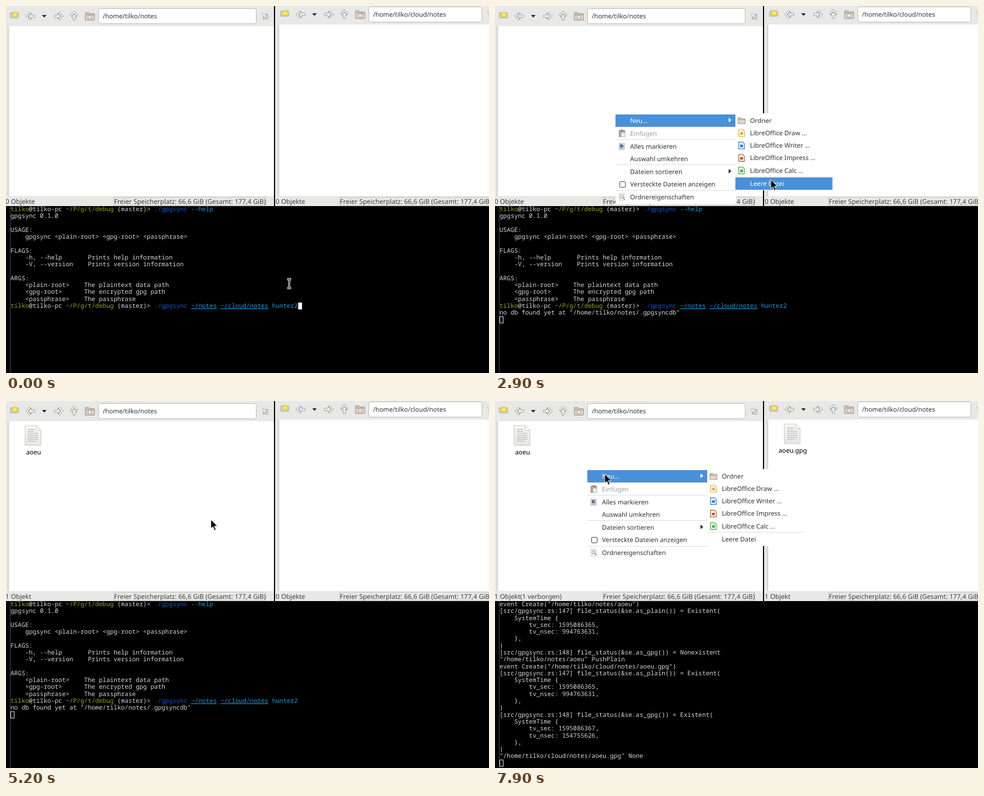
These frames come from a looping animation (858x653 px, 8000 ms). An HTML page:

```html
<!DOCTYPE html>
<html lang="de">
<head>
<meta charset="utf-8">
<title>gpgsync demo</title>
<style>
  html, body { margin: 0; width: 100%; height: 100%; overflow: hidden; background: #000; }
  svg { display: block; width: 858px; height: 653px; }
  text { font-family: "Noto Sans", sans-serif; font-size: 11.35px; fill: #2e3436;
         white-space: pre; text-rendering: geometricPrecision; }
  .status { font-size: 11.64px; fill: #3a3f41; }
  .term text { font-family: "Noto Sans Mono", monospace; font-size: 10.917px; fill: #d8d8d8; }
</style>
</head>
<body>
<svg id="stage" viewBox="0 0 858 653">
  <defs>
    <linearGradient id="button" x2="0" y2="1">
      <stop stop-color="#e9e9e7"/><stop offset="1" stop-color="#d2d2d0"/>
    </linearGradient>
    <linearGradient id="paper" x2="0" y2="1">
      <stop stop-color="#fafaf9"/><stop offset="1" stop-color="#e6e6e3"/>
    </linearGradient>
    <g id="arrow" stroke="#979797" fill="#f4f4f2" stroke-width="1" stroke-linejoin="round">
      <path d="M-9 0L-2-7L0-5L-5 0L0 5L-2 7Z"/>
      <path d="M-4 0L1-5V-2H7V2H1V5Z"/>
    </g>
    <g id="sheet">
      <path d="M.5.5H20L28.5 9V35.5H.5Z" fill="url(#paper)" stroke="#c4c4c0"/>
      <path d="M20 .5V9H28.5Z" fill="#fff" stroke="#c4c4c0"/>
      <path d="M5 7H17M5 10.5H17M5 14H24M5 17.5H24M5 21H24M5 24.5H24M5 28H19" stroke="#c3c3c1" stroke-width="1.4"/>
    </g>
    <g id="folder" stroke="#a89a8c">
      <path d="M-8-6.5H-2L0-4.5H8V7H-8Z" fill="#cbbfb2"/>
      <path d="M-8-2H8V7H-8Z" fill="#ded5cb"/>
    </g>
  </defs>
</svg>
<script>
const LOOP = 8000, STEP = 100, ROW = 12.29, CHAR = 6.55;
const USER = 'tilko', HOME = `/home/${USER}`;
const BLUE = '#4a90d9', BAR = '#e8e8e6';
const stage = document.getElementById('stage');

const escape = s => s.replace(/&/g, '&amp;').replace(/</g, '&lt;').replace(/>/g, '&gt;');
const label = (x, y, s, attrs = '') => `<text x="${x}" y="${y + 4}" ${attrs}>${escape(s)}</text>`;
const rect = (x, y, w, h, fill, attrs = '') =>
  `<rect x="${x}" y="${y}" width="${w}" height="${h}" fill="${fill}" ${attrs}/>`;
const group = (id, body, attrs = '') => `<g id="${id}" ${attrs}>${body}</g>`;
const use = (id, x, y, extra = '') => `<use href="#${id}" transform="translate(${x} ${y}) ${extra}"/>`;

// Terminal
const span = (color, s, attrs = '') => `<tspan fill="${color}" ${attrs}>${escape(s)}</tspan>`;
const prompt = span('#96a81e', USER) + `@${USER}-pc ` + span('#96a81e', '~/P/g/t/debug') +
  escape(' (master)> ') + span('#0a5bd0', './gpgsync') + ' ';
const argument = (s, attrs) => span('#1a9be0', s, attrs);
const underline = 'text-decoration="underline"';

const stamp = (sec, nsec) => ['    SystemTime {', `        tv_sec: ${sec},`, `        tv_nsec: ${nsec},`, '    },', ')'];
const plainCheck = ['[src/gpgsync.rs:147] file_status(&se.as_plain()) = Existent(', ...stamp(1595086365, 994763631)];
const gpgCheck = '[src/gpgsync.rs:148] file_status(&se.as_gpg()) = ';

const lines = [
  prompt + argument('--help'),
  ...[
    'gpgsync 0.1.0', '',
    'USAGE:', '    gpgsync <plain-root> <gpg-root> <passphrase>', '',
    'FLAGS:', '    -h, --help       Prints help information', '    -V, --version    Prints version information', '',
    'ARGS:', '    <plain-root>    The plaintext data path', '    <gpg-root>      The encrypted gpg path',
    '    <passphrase>    The passphrase'
  ].map(escape),
  prompt + argument('~/notes', underline) + ' ' + argument('~/cloud/notes', underline) + ' ' + argument('hunter2'),
  ...[
    `no db found yet at "${HOME}/notes/.gpgsyncdb"`,
    `event Create("${HOME}/notes/aoeu")`, ...plainCheck, gpgCheck + 'Nonexistent',
    `"${HOME}/notes/aoeu" PushPlain`,
    `event Create("${HOME}/cloud/notes/aoeu.gpg")`, ...plainCheck,
    gpgCheck + 'Existent(', ...stamp(1595086367, 154755626),
    `"${HOME}/cloud/notes/aoeu.gpg" None`
  ].map(escape)
];
const terminal = rect(0, 356, 858, 297, '#000') + rect(7, 356, 1, 297, '#4c4c4c') +
  group('scroll', lines.map((line, i) => `<text class="line" x="8" y="${365 + i * ROW}">${line}</text>`).join('') +
    rect(0, 0, 6, 11.4, '#fff', 'id="caret" stroke="#e6e6e6"'));

// File manager windows
const toolbar = (entryWidth, path) =>
  rect(8, 12, 14, 9, '#d9d0c4', 'rx="1" stroke="#a59b8f"') +
  '<path d="M16 9L17.7 13L22 13.4L18.8 16.2L19.8 20.4L16 18.2L12.2 20.4L13.2 16.2L10 13.4L14.3 13Z" fill="#fff04a" stroke="#e2c91c" stroke-width=".8"/>' +
  use('arrow', 44, 18) + '<path d="M64 16H72L68 20.5Z" fill="#222"/>' +
  use('arrow', 93, 18, 'scale(-1 1)') + use('arrow', 121, 18, 'rotate(90)') + use('folder', 149, 18) +
  '<path d="M145 20L149 16L153 20H152V23H146V20Z" fill="#efe9e2" stroke="#a08f80" stroke-width=".8"/>' +
  rect(164.5, 4.5, entryWidth, 27, '#fff', 'rx="3" stroke="#b9b9b6"') + label(172, 18, path) +
  use('arrow', 180 + entryWidth, 18, 'rotate(225) scale(.85)');

const fileWindow = (id, x, dy, width, entryWidth, path, file) =>
  `<svg x="${x}" y="0" width="${width}" height="356" overflow="hidden">` + rect(0, 0, width, 356, BAR) +
  `<g transform="translate(${id === 'left' ? 0 : 2} ${dy})">` + toolbar(entryWidth, path) +
  rect(3, 36, 1, 302 - dy, '#c3c3c1') + rect(6, 36, width, 302 - dy, '#fff') +
  group(id + 'File', use('sheet', 33.5, 43.5) + label(49, 91, file, 'text-anchor="middle" style="fill:#000"')) + '</g>' +
  rect(0, 338, width, 18, BAR) +
  label(id === 'left' ? -1 : 1, 347.5, '', `id="${id}Count" class="status"`) +
  rect(id === 'left' ? 191.5 : 114.5, 340.5, 270, 14, 'none', 'stroke="#c2c6bc"') +
  label(id === 'left' ? 192 : 115, 347.5, 'Freier Speicherplatz: 66,6 GiB (Gesamt: 177,4 GiB)', 'class="status"') + '</svg>';

const windows = rect(0, 0, 858, 356, '#000') +
  fileWindow('left', 0, 0, 476, 280, HOME + '/notes', 'aoeu') +
  fileWindow('right', 478, -3, 380, 201, HOME + '/cloud/notes', 'aoeu.gpg');

// Context menu, placed relative to its top left corner
const separator = (x, y, w) => rect(x, y, w, 1, '#dcdcda');
const expander = (y, id = '') => `<path id="${id}" d="M201 ${y - 4}L206 ${y}L201 ${y + 4}Z" fill="#2e3436"/>`;
const docIcon = (x, y, color) =>
  `<path d="M${x - 5} ${y - 6}H${x + 2}L${x + 5} ${y - 3}V${y + 6}H${x - 5}Z" fill="#fff" stroke="${color}" stroke-width="1.2"/>` +
  rect(x - 2.5, y - 1.5, 5, 4.5, color);
const menu =
  rect(0, 0, 214, 162, '#fff') + rect(0, 2, 214, 22, BLUE, 'id="hoverNew"') +
  label(26, 13, 'Neu…', 'id="newLabel"') + expander(12, 'newArrow') +
  rect(6.5, 30.5, 10, 11, '#b9aa99', 'stroke="#938678"') + rect(9, 29, 5, 3, '#8b8b8b') + rect(10, 34, 7, 8, '#eee', 'stroke="#999" stroke-width=".7"') +
  label(26, 36, 'Einfügen', 'style="fill:#9b9fa0"') + separator(0, 46, 214) +
  rect(6.5, 53.5, 9, 11, '#f5f5f5', 'stroke="#aaa"') + rect(8, 55, 5, 6, '#4f73a8') + '<path d="M8 62.5H14M14 56V61" stroke="#888"/>' +
  label(26, 59, 'Alles markieren') + label(26, 81, 'Auswahl umkehren') + separator(0, 91, 214) +
  label(26, 104, 'Dateien sortieren') + expander(103) +
  rect(7.5, 121.5, 10, 10, '#fff', 'rx="1.5" stroke="#444"') + label(26, 126, 'Versteckte Dateien anzeigen') +
  separator(0, 137, 214) +
  rect(6.5, 142.5, 9, 12, '#f7f7f6', 'stroke="#ccc"') +
  '<circle cx="11" cy="148" r="3" fill="#e3e6e8" stroke="#999"/><path d="M13 150L17 154" stroke="#999" stroke-width="1.6"/>' +
  label(26, 149, 'Ordnereigenschaften') +
  group('submenu', rect(0, 0, 172.5, 137, '#fff') +
    rect(0, 2, 172.5, 22, BLUE, 'id="hoverFolder"') + rect(0, 114, 172.5, 22, BLUE, 'id="hoverEmpty"') +
    use('folder', 11, 13, 'scale(.8)') + label(26, 13, 'Ordner', 'id="folderLabel"') +
    [['Draw', '#dfaa25'], ['Writer', '#1e78c8'], ['Impress', '#b8541f'], ['Calc', '#35b52f']]
      .map(([app, color], i) => docIcon(11, 35 + i * 22.2, color) + label(26, 35 + i * 22.2, `LibreOffice ${app} …`)).join('') +
    separator(0, 112, 172.5) + label(26, 124.5, 'Leere Datei', 'id="emptyLabel"'),
    'transform="translate(213 0)"');

// Name dialog
const button = (x, text, textX, icon, id = '') =>
  rect(x + .5, 190.5, 93, 28, 'url(#button)', `id="${id}" rx="3" stroke="#b3b3b0"`) + icon + label(textX, 204.5, text);
const dialog = rect(41.5, 105.5, 394, 124, BAR, 'stroke="#565a5b"') +
  label(47, 124.5, 'Bitte geben Sie einen Namen für die leere Datei ein:') +
  rect(49, 148.5, 378, 26, '#fff', `rx="3" stroke="${BLUE}" stroke-width="2"`) +
  rect(56, 153, 23, 16, BLUE, 'id="selection"') + label(56.5, 161, '', 'id="entry"') +
  rect(0, 154, 1, 14, '#000', 'id="insert"') +
  button(231, 'Abbrechen', 257.5, '<path d="M244 198L254 210M254 198L244 210" stroke="#b72b2b" stroke-width="4"/><path d="M244 198L254 210M254 198L244 210" stroke="#f05a54" stroke-width="2.4"/>') +
  button(331, 'OK', 378, '<path d="M361 206L367 200V203.500H371V197H376V208.500H367V212Z" fill="#a9c8ea" stroke="#3e6da6" stroke-linejoin="round"/>', 'okButton');

const pointer =
  group('ibeam', ['#fff" stroke-width="3.4', '#000" stroke-width="1.2'].map(style =>
    `<path d="M-3.500-8H3.500M0-8V8M-3.500 8H3.500" fill="none" stroke="${style}"/>`).join('')) +
  group('arrowPointer', '<path d="M0 0V16L3.700 12.700L6.500 19.300L9 18.200L6.300 11.700H11.500Z" fill="#000" stroke="#fff" stroke-width=".9"/>');

stage.innerHTML += group('term', terminal, 'class="term"') + windows +
  group('menu', menu) + group('dialog', dialog) + group('pointer', pointer);

const el = id => document.getElementById(id);
const show = (id, on) => el(id).setAttribute('visibility', on ? 'inherit' : 'hidden');
const move = (id, x, y) => el(id).setAttribute('transform', `translate(${x} ${y})`);
const tint = (id, on) => { el(id).style.fill = on ? '#fff' : '#2e3436'; };
const setText = (id, s) => { el(id).textContent = s; };

// Each step holds until the next: [time, ...values]
const at = (steps, t) => steps.filter(step => step[0] <= t).pop().slice(1);

const pointerSteps = [
  [0, 503, 494], [1100, 545, 430], [1200, 571, 335], [1300, 470, 262], [1400, 320, 213], [1500, 213, 191],
  [1900, 230, 197], [2000, 243, 200], [2200, 246, 198], [2400, 370, 203], [2500, 440, 204], [2900, 490, 309],
  [3400, 440, 275], [3500, 360, 235], [3600, 285, 198], [3700, 244, 182],
  [4700, 285, 190], [4800, 340, 205], [4900, 364, 211], [5500, 345, 194], [5600, 322, 179],
  [5800, 290, 158], [5900, 267, 146], [6200, 245, 140], [6300, 215, 132], [6400, 190, 126], [6500, 174, 123],
  [6700, 168, 122], [6900, 163, 121], [7600, 172, 125], [7700, 186, 129], [7800, 195, 130]
];
// Printed lines and first visible line
const outputSteps = [[0, 15, 0], [600, 16, 0], [6200, 25, 2], [7400, 39, 16]];
const entrySteps = [[0, 'Neu'], [4000, 'a'], [4300, 'aoe'], [4400, 'aoeu']];

function render(t) {
  const within = (from, to = LOOP) => t >= from && t < to;

  const [px, py] = at(pointerSteps, t);
  move('pointer', px, py);
  show('ibeam', py > 356);
  show('arrowPointer', py <= 356);

  const [count, top] = at(outputSteps, t);
  document.querySelectorAll('.line').forEach((line, i) =>
    line.setAttribute('visibility', i < count && i >= top ? 'visible' : 'hidden'));
  move('scroll', 0, -top * ROW);
  const typed = t < 600, focused = t < 1300, caret = el('caret');
  caret.setAttribute('x', typed ? 8 + 78 * CHAR + .5 : 8.5);
  caret.setAttribute('y', 356 + (typed ? 14 : count) * ROW);
  caret.setAttribute('fill', focused ? '#fff' : 'none');

  show('leftFile', within(5200));
  show('rightFile', within(6500));
  setText('leftCount', t < 5200 ? '0 Objekte' : t < 6700 ? '1 Objekt' : '1 Objekt(1 verborgen)');
  setText('rightCount', t < 6500 ? '0 Objekte' : '1 Objekt');

  const hover = within(1900, 3200) || within(7600);
  const overFolder = within(2500, 2900), overEmpty = within(2900, 3200);
  show('menu', within(1700, 3200) || within(7400));
  move('menu', t < 5000 ? 214 : 164, t < 5000 ? 191 : 121);
  show('hoverNew', hover && (within(1900, 3200) || within(7600)));
  tint('newLabel', hover);
  tint('newArrow', hover);
  show('submenu', within(2200, 3200) || within(7900));
  for (const [id, on] of [['Folder', overFolder], ['Empty', overEmpty]]) {
    show('hover' + id, on);
    tint(id.toLowerCase() + 'Label', on);
  }

  const [name] = at(entrySteps, t), editing = within(4000, 5100);
  show('dialog', within(3200, 5100));
  show('selection', within(3200, 4000));
  show('insert', editing);
  setText('entry', name);
  tint('entry', !editing);
  if (editing) el('insert').setAttribute('x', 57 + el('entry').getComputedTextLength());
  el('okButton').style.fill = within(4900, 5100) ? '#ececea' : '';
}

function frame() {
  render(Math.floor(performance.now() % LOOP / STEP) * STEP);
  requestAnimationFrame(frame);
}
frame();
</script>
</body>
</html>
```
